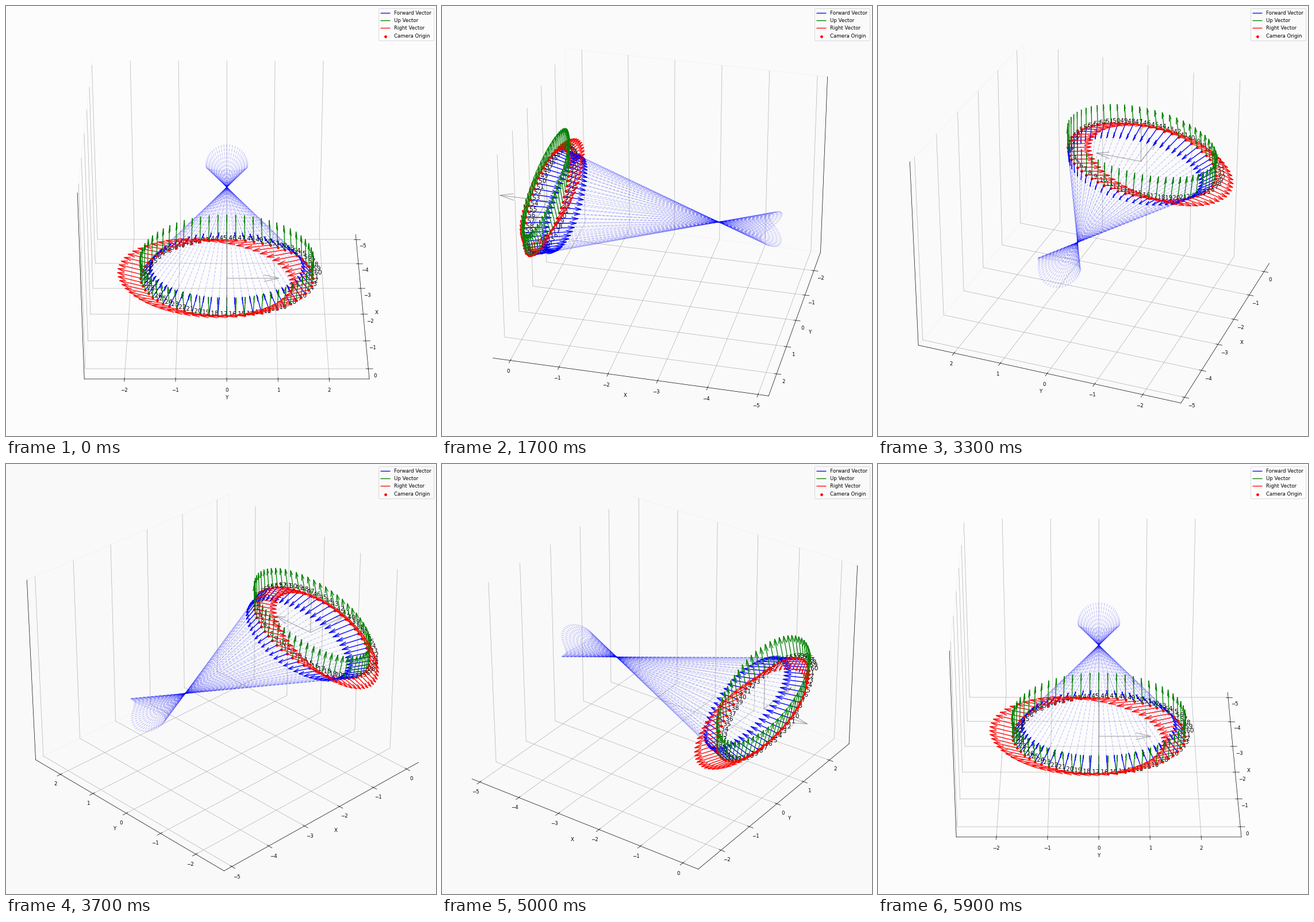
Recreate the animation shown at these times as a matplotlib script. Size 748 by 748 pixels, loop 6000 ms.

```python
import numpy as np
import matplotlib.pyplot as plt
from matplotlib.animation import FuncAnimation

SIZE = 748
FRAMES = 60
INTERVAL = 100
CAMERAS = 60
RADIUS_Y, RADIUS_Z = 1.657, 0.858
FOCUS = np.array([-3.575, 0, 0])
CENTER_X, HALF = -2.424, 2.784


def unit(v):
    return v / np.linalg.norm(v, axis=1, keepdims=True)


def camera_path():
    """Elliptic path with orthonormal axes looking at the focus point."""
    t = np.arange(CAMERAS) * 2 * np.pi / CAMERAS
    origin = np.column_stack([0 * t, RADIUS_Y * np.cos(t), -RADIUS_Z * np.sin(t)])
    forward = unit(FOCUS - origin)
    right = unit(np.cross([0, 0, 1], forward))
    up = np.cross(forward, right)
    return origin, forward, up, right


fig = plt.figure(figsize=(12, 12), dpi=SIZE / 12)
ax = fig.add_axes([0, 0, 1, 1], projection="3d", facecolor="none")

origin, forward, up, right = camera_path()


def arrows(vectors, color, label=None, length=0.5, **style):
    ax.quiver(*origin.T, *vectors.T, length=length, color=color, label=label, **style)


arrows(forward, "blue", "Forward Vector")
arrows(up, "green", "Up Vector")
arrows(right, "red", "Right Vector")
arrows(forward, "blue", length=5, arrow_length_ratio=0, linestyle="dashed", alpha=0.2)
ax.scatter(*origin.T, color="red", s=20, depthshade=False, label="Camera Origin")
for n, point in enumerate(origin, 1):
    ax.text(*point, f" {n}", fontsize=12)

# World axes
zero = np.zeros(3)
ax.quiver(zero, zero, zero, *np.eye(3), color="gray", alpha=0.6)

ax.set(
    xlim=(CENTER_X - HALF, CENTER_X + HALF),
    ylim=(-HALF, HALF),
    zlim=(-0.75 * HALF, 0.75 * HALF),
    xticks=range(-5, 1),
    yticks=range(-2, 3),
    zticks=[],
    xlabel="X",
    ylabel="Y",
)
ax.xaxis.pane.set_visible(False)
ax.zaxis.pane.set_visible(False)
ax.yaxis.pane.set_fill(False)
ax.yaxis.pane.set_edgecolor("#ebebeb")
ax.legend(loc="upper right", facecolor="none")


def background(azim):
    """Near-white tone, a little darker when more of the side walls show."""
    a = np.radians(azim)
    shade = 2.05 + 1.35 * abs(np.cos(a)) + 2.85 * abs(np.sin(a)) + 0.6 * abs(np.sin(2 * a))
    return [1 - shade / 255] * 3


def update(i):
    # The tiny offset settles which wall is at the back when seen edge-on.
    azim = 360 * i / (FRAMES - 1) + 0.001
    ax.view_init(elev=30, azim=azim)
    fig.set_facecolor(background(azim))
    return []


anim = FuncAnimation(fig, update, frames=FRAMES, init_func=lambda: update(0),
                     interval=INTERVAL, repeat=True)
plt.show()
```
